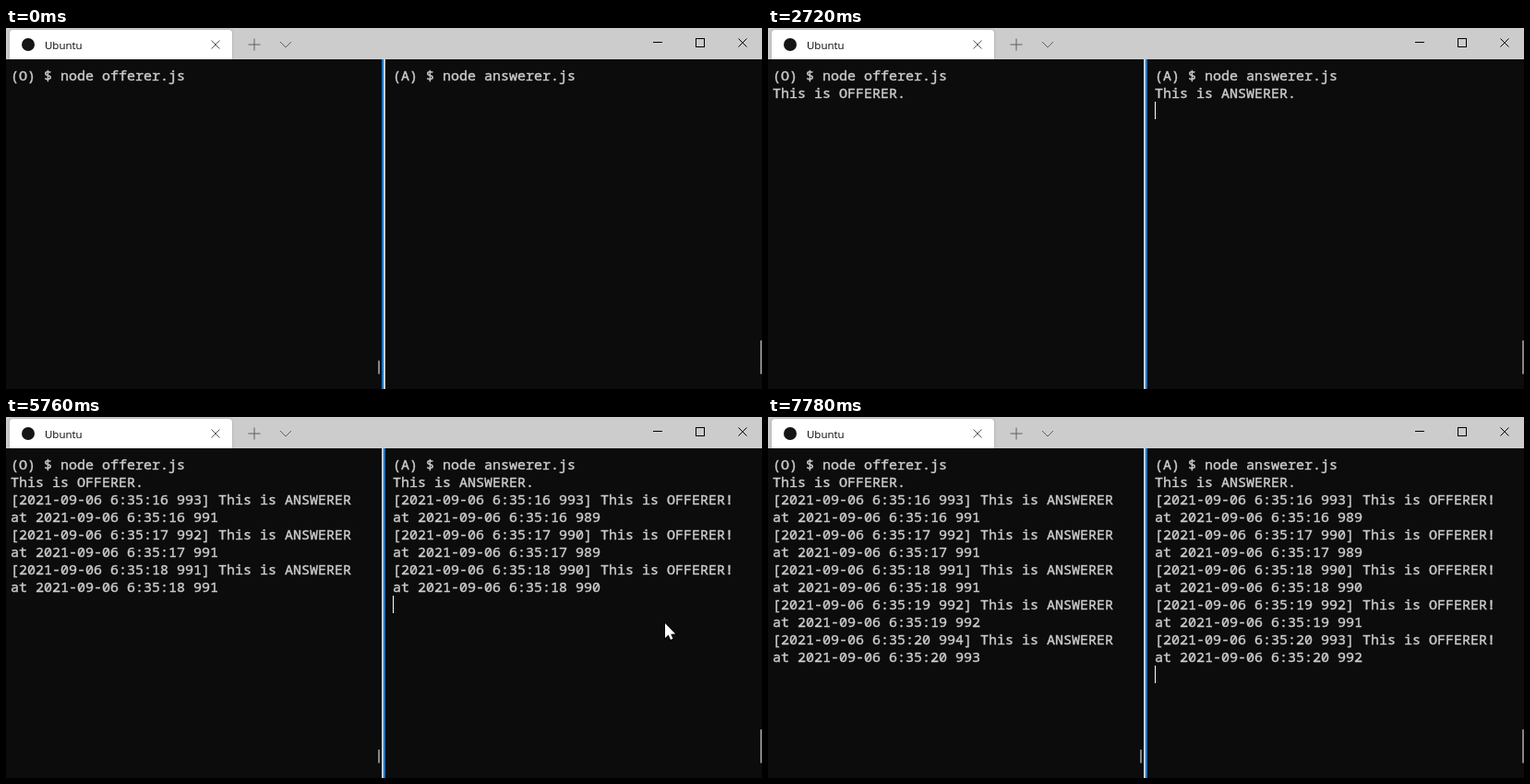
Recreate the animation shown at these times as an HTML page with a canvas. Size 819 by 392 pixels, loop 8.04 s.

```html
<!DOCTYPE html>
<html lang="en">
<head>
<meta charset="utf-8">
<title>Two terminal panes</title>
<style>
  html, body { margin: 0; width: 100%; height: 100%; overflow: hidden; background: #0c0c0c; }
  canvas { display: block; width: 819px; height: 392px; }
</style>
</head>
<body>
<canvas id="stage" width="819" height="392"></canvas>
<script>
const ctx = document.getElementById('stage').getContext('2d');
const LOOP = 8040, ROW = 19, CHAR = 9, TOP = 42;
const LEFT = 5, RIGHT = 419;
const STARTED = 1130, FOCUSED = 1600, ANSWERED = 2720, CLOSING = 7780;
const GREY = '#cccccc', BLUE = '#0078d7', BLACK = '#000000', WHITE = '#ffffff';

// One entry per second; the capture clock drifts slightly around the middle one.
const logTime = i => 3760 + 1000 * i + 10 * Math.abs(i - 2);

const offerer = {
  x: LEFT, greetAt: STARTED,
  command: '(O) $ node offerer.js', greeting: 'This is OFFERER.',
  message: 'This is ANSWERER', received: '993 992 991 992 994', sent: '991 991 991 992 993'
};
const answerer = {
  x: RIGHT, greetAt: ANSWERED,
  command: '(A) $ node answerer.js', greeting: 'This is ANSWERER.',
  message: 'This is OFFERER!', received: '993 990 990 992 993', sent: '989 989 990 991 992'
};

// Pointer moves; it rests at the end of each until the next, or until hidden.
const glides = [
  { start: STARTED, end: 1330, steps: 4, from: [668, 206], to: [691, 153] },
  { start: FOCUSED, end: 1660, steps: 2, from: [694, 152], to: [692, 152], hide: ANSWERED },
  { start: logTime(2), end: 5890, steps: 3, from: [714, 224], to: [768, 311] },
  { start: logTime(3), end: 7120, steps: 6, from: [768, 311], to: [792, 375], hide: CLOSING }
];

function rect(color, x, y, w, h) {
  ctx.fillStyle = color;
  ctx.fillRect(x, y, w, h);
}

function rounded(color, x, y, w, h, radii) {
  ctx.fillStyle = color;
  ctx.beginPath();
  ctx.roundRect(x, y, w, h, radii);
  ctx.fill();
}

function line(color, ...points) {
  ctx.strokeStyle = color;
  ctx.lineWidth = 1;
  ctx.beginPath();
  points.forEach(([x, y]) => ctx.lineTo(x, y));
  ctx.stroke();
}

function cross(color, x, y, size) {
  line(color, [x, y], [x + size, y + size]);
  line(color, [x + size, y], [x, y + size]);
}

function drawTitleBar() {
  rect(GREY, 0, 0, 819, 34);
  ctx.save();
  ctx.beginPath();
  ctx.rect(0, 0, 819, 34);
  ctx.clip();
  ctx.shadowColor = 'rgba(0,0,0,.2)';
  ctx.shadowBlur = 3;
  rounded(WHITE, 4, 2, 241, 32, [4, 4, 0, 0]);
  ctx.restore();

  rounded('#151515', 17, 11, 14, 14, 7);

  ctx.fillStyle = BLACK;
  ctx.font = '11.5px "Open Sans", "Noto Sans", sans-serif';
  ctx.fillText('Ubuntu', 42, 23);

  cross('#5a5a5a', 222.5, 13.5, 9);
  line('#5f5f5f', [262.5, 18], [275.5, 18]);
  line('#5f5f5f', [269, 11.5], [269, 24.5]);
  line('#5f5f5f', [297, 15], [303, 21], [309, 15]);

  rect(BLACK, 701, 15, 10, 1);
  ctx.strokeStyle = BLACK;
  ctx.strokeRect(747.5, 11.5, 9, 9);
  cross(BLACK, 793.5, 11.5, 9);
}

function paneLines(pane, t) {
  const lines = [pane.command];
  if (t >= pane.greetAt) lines.push(pane.greeting);
  const sent = pane.sent.split(' ');
  pane.received.split(' ').forEach((received, i) => {
    if (t < logTime(i)) return;
    const stamp = `2021-09-06 6:35:${16 + i} `;
    lines.push(`[${stamp}${received}] ${pane.message}`, `at ${stamp}${sent[i]}`);
  });
  return lines;
}

function drawPane(pane, t) {
  ctx.fillStyle = ctx.strokeStyle = GREY;
  ctx.lineWidth = 0.4; // thickens the regular weight a little
  ctx.font = '15px "Noto Sans Mono", "DejaVu Sans Mono", monospace';
  paneLines(pane, t).forEach((text, row) => {
    const y = TOP + 15 + row * ROW;
    ctx.fillText(text, pane.x, y);
    ctx.strokeText(text, pane.x, y);
  });
}

function drawBorders(t) {
  const focused = t >= FOCUSED;
  rect(focused ? GREY : BLUE, 407, 34, 2, 358);
  rect(focused ? BLUE : GREY, 409, 34, 2, 358);
  if (t < STARTED || t >= logTime(0)) rounded('#858585', 403, 361, 2, 15, 1);
  rounded('#858585', 817, 339, 2, 37, 1);
}

function drawCaret(t) {
  if (t < FOCUSED) return;
  const waiting = t < ANSWERED;
  const column = waiting ? answerer.command.length + 1 : 0;
  const row = waiting ? 0 : paneLines(answerer, t).length;
  rect(WHITE, RIGHT + column * CHAR, TOP + row * ROW, 1, ROW);
}

function drawPointer(t) {
  const glide = glides.findLast(g => t >= g.start);
  if (!glide || t >= glide.hide) return;
  const { start, end, steps, from, to } = glide;
  const last = steps - 1;
  // The small bias absorbs rounding of the step times.
  const step = Math.min(last, Math.floor((t - start) / (end - start) * last + 0.06));
  const [x, y] = from.map((a, i) => Math.round(a + (to[i] - a) * step / last));

  const arrow = [[0, 0], [0, 16], [3.6, 12.6], [6, 17.8], [8.5, 16.8], [6.2, 11.8], [11.2, 11.4]];
  ctx.beginPath();
  arrow.forEach(([dx, dy]) => ctx.lineTo(x + dx, y + dy));
  ctx.closePath();
  ctx.strokeStyle = BLACK;
  ctx.lineWidth = 2;
  ctx.stroke();
  ctx.fillStyle = WHITE;
  ctx.fill();
}

function draw(t) {
  rect('#0c0c0c', 0, 0, 819, 392);
  drawTitleBar();
  drawPane(offerer, t);
  drawPane(answerer, t);
  drawBorders(t);
  drawCaret(t);
  drawPointer(t);
}

const begin = performance.now();
function tick() {
  draw((performance.now() - begin) % LOOP);
  requestAnimationFrame(tick);
}
tick();
</script>
</body>
</html>
```
